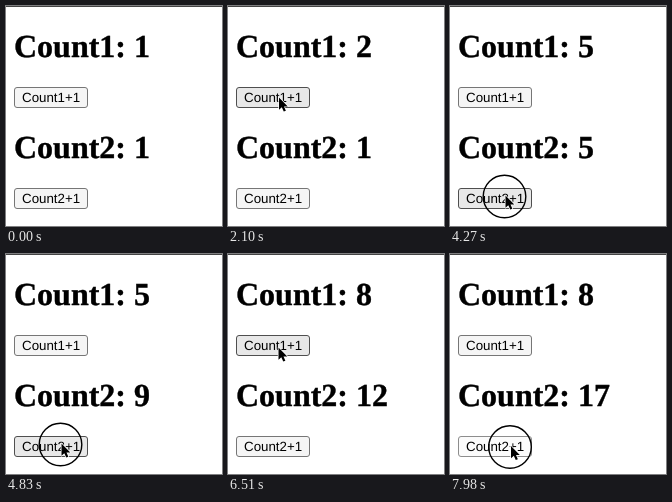
Recreate the animation shown at these times as an HTML page. Size 216x220 px, loop 8 s.

```html
<!DOCTYPE html>
<html lang="en">
<head>
<meta charset="utf-8">
<title>Two counters</title>
<style>
  html, body { margin: 0; width: 100%; height: 100%; overflow: hidden; background: #fff; }
  svg { display: block; width: 216px; height: 220px; text-rendering: geometricPrecision; }
  .title { font: bold 32px "Liberation Serif", Times, serif; stroke: #000; stroke-width: .4; }
  .label { font: 13.333px "Liberation Sans", Arial, sans-serif; }
  .button { fill: #f5f5f5; stroke: #767676; }
  .button.hover { fill: #e8e8e8; stroke: #4f4f4f; }
  .button.active { fill: #fbfbfb; stroke: #8d8d8d; }
</style>
</head>
<body>
<svg viewBox="0 0 216 220">
  <rect width="216" height="1" fill="#444"/>
  <text class="title" x="8" y="51"></text>
  <rect class="button" x="8.5" y="81.5" width="73" height="20" rx="2.5"/>
  <text class="label" x="16" y="96">Count1+1</text>
  <text class="title" x="8" y="152"></text>
  <rect class="button" x="8.5" y="182.5" width="73" height="20" rx="2.5"/>
  <text class="label" x="16" y="197">Count2+1</text>
  <g id="pointer">
    <circle id="ring" cx="-1" cy="1" r="21.3" fill="none" stroke="#000" stroke-width="1.4"/>
    <path d="M0 0V14L3.2 11L5.4 16L7.8 15L5.7 10.1H10Z" transform="scale(.88)" stroke="#fff"
          stroke-width="1.6" stroke-linejoin="round" paint-order="stroke"/>
  </g>
</svg>
<script>
const LOOP = 8000, TICK = 70;

// Each move eases on from where the last one ended; bend bows it to the right
const start = { x: 150, y: 222 };
const moves = [
  { from: 210, to: 630, x: 140.5, y: 191.5 },
  { from: 1260, to: 1540, x: 51, y: 91.5 },
  { from: 3080, to: 3500, x: 55.5, y: 189.5 },
  { from: 5250, to: 5670, x: 50.5, y: 93.5, bend: 11.7 },
  { from: 6650, to: 7070, x: 62, y: 203 },
  { from: 7070, to: 7210, x: 61, y: 192 }
];

// A run of evenly spaced clicks; lag is the delay before the button looks pressed
const run = (button, at, count, every, hold, lag = TICK) =>
  Array.from({ length: count }, (_, i) => {
    const down = at + i * every;
    return { button, down, up: down + hold, lag };
  });
const clicks = [
  run(-1, 700, 1, 0, 140),
  run(0, 1960, 4, 280, 140),
  run(1, 3640, 1, 0, 140),
  run(1, 3850, 10, 140, 70),
  run(0, 5880, 3, 280, 70),
  run(1, 7280, 6, 140, 70, 0)
].flat();

const titles = document.querySelectorAll('.title');
const buttons = document.querySelectorAll('.button');
const pointer = document.getElementById('pointer');
const ring = document.getElementById('ring');

function tipAt(t) {
  let { x, y } = start;
  for (const m of moves) {
    const k = Math.min(1, Math.max(0, (t - m.from) / (m.to - m.from)));
    const eased = k * k * (3 - 2 * k);
    x += (m.x - x) * eased + (m.bend || 0) * Math.sin(Math.PI * k);
    y += (m.y - y) * eased;
  }
  return [x, y];
}

function draw(t) {
  const [x, y] = tipAt(t);
  const press = clicks.find(c => t >= c.down && t < c.up);
  pointer.setAttribute('transform', `translate(${x} ${y})`);
  ring.setAttribute('visibility', press ? 'visible' : 'hidden');

  buttons.forEach((button, i) => {
    const top = 81 + 101 * i;
    const over = x >= 8 && x < 82 && y >= top && y < top + 21;
    const active = press && press.button === i && t >= press.down + press.lag;
    button.classList.toggle('hover', over);
    button.classList.toggle('active', Boolean(active));

    const count = 1 + clicks.filter(c => c.button === i && t >= c.up).length;
    titles[i].textContent = `Count${i + 1}: ${count}`;
  });
}

function frame() {
  const t = performance.now() % LOOP;
  draw(Math.floor(t / TICK) * TICK);
  requestAnimationFrame(frame);
}
frame();
</script>
</body>
</html>
```
